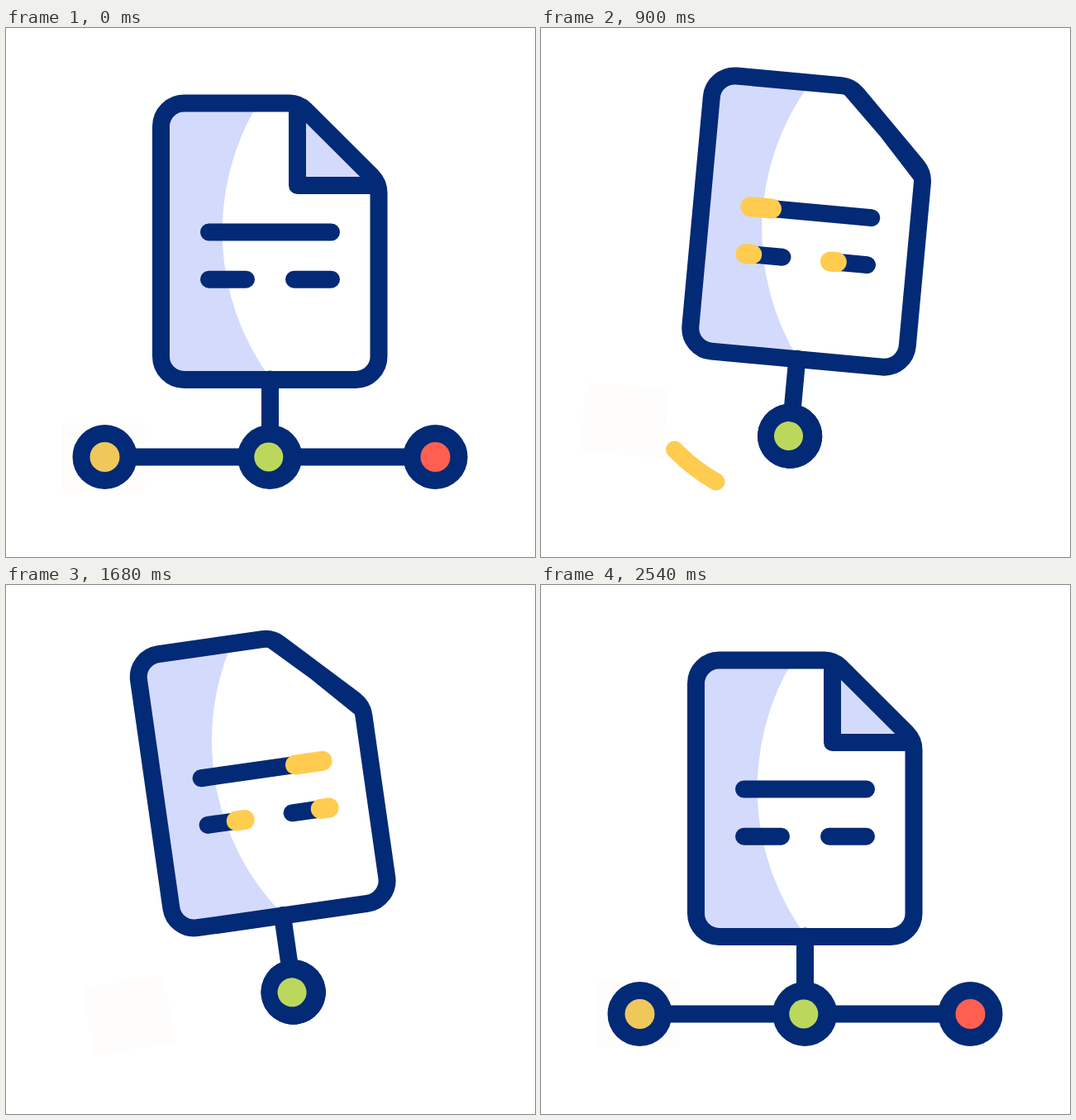
An HTML page that plays this animation: 640x640 px, repeating every 2.8 s.

```html
<!DOCTYPE html>
<html lang="en">
<head>
<meta charset="utf-8">
<title>Document network</title>
<style>
  html, body { margin: 0; width: 100%; height: 100%; overflow: hidden; background: #fff; }
  svg { display: block; width: 100%; height: 100%; }
  .line { fill: none; stroke: #032a76; stroke-width: 21; stroke-linecap: round; stroke-linejoin: round; }
  .glow { fill: none; stroke: #ffcc4f; stroke-width: 21; stroke-linecap: round; }
  .wide { stroke-width: 24; }
  .ring { fill: #032a76; }
  .tint { fill: #d4dafc; }
</style>
</head>
<body>
<svg viewBox="0 0 640 640">
  <path id="smile" class="glow"/>
  <g id="trail">
    <path class="glow"/>
    <path class="glow"/>
  </g>
  <g id="icon">
    <rect x="68" y="477" width="100" height="83" fill="#fffdfb"/>
    <path class="line" d="M319.5 425V500"/>
    <path id="wire" class="line"/>
    <g id="left">
      <circle class="ring" r="39"/>
      <circle r="18" fill="#f0c75b"/>
    </g>
    <g id="right">
      <circle class="ring" r="39"/>
      <circle r="18" fill="#ff5f51"/>
    </g>
    <circle class="ring" cx="319.2" cy="519" r="39"/>
    <circle cx="317.8" cy="519" r="17.5" fill="#bbd85d"/>

    <path class="tint" d="M305 91A300 300 0 0 0 321 425.5H215.5a28 28 0 0 1-28-28V119a28 28 0 0 1 28-28Z"/>
    <path id="flap" class="tint"/>
    <path id="fold" class="line"/>
    <path class="line" d="M215.5 91H342.5Q354 91 362 99L442.5 179.3Q451 188 451 199.5V397.5a28 28 0 0 1-28 28H215.5a28 28 0 0 1-28-28V119a28 28 0 0 1 28-28Z"/>
    <path class="line" d="M245.5 247H393.5M245.5 304.2H290.5M348.5 304.2H393.5"/>
    <g id="marks">
      <path class="glow wide"/>
      <path class="glow wide"/>
      <path class="glow wide"/>
    </g>
  </g>
</svg>
<script>
const LOOP = 2800, STEP = 20;
const CX = 319.5, CY = 319, NODE_Y = 519, SPREAD = 200;
const ROWS = [[245.5, 393.5, 247], [245.5, 290.5, 304.2], [348.5, 393.5, 304.2]];

const $ = id => document.getElementById(id);
const mix = (a, b, k) => a + (b - a) * k;
const phase = (t, a, b) => Math.min(1, Math.max(0, (t - a) / (b - a)));
const sine = (t, a, b) => (1 - Math.cos(Math.PI * phase(t, a, b))) / 2;
const cubic = (t, a, b) => {
  const p = phase(t, a, b);
  return p < 0.5 ? 4 * p ** 3 : 1 - 4 * (1 - p) ** 3;
};

function tilt(t) {
  if (t < 415) return -14.6 * cubic(t, 90, 415);
  if (t < 1172) return mix(-14.6, 13.2, sine(t, 415, 1172));
  if (t < 1920) return mix(13.2, -14.6, sine(t, 1172, 1920));
  return mix(-14.6, 0, sine(t, 1920, 2304));
}

const lift = t => 24.4 * (sine(t, 100, 700) - sine(t, 1680, 2520));

function spread(t) {
  return t < 1300
    ? SPREAD * (1 - phase(t, 100, 756) ** 3)
    : SPREAD * (1 - (1 - phase(t, 1818, 2474)) ** 3);
}

const pose = (angle, up) => `translate(0 ${-up}) rotate(${angle} ${CX} ${CY})`;

// Draws the part of a stroke between two fractions, or nothing when empty
function trim(el, from, to, path) {
  el.setAttribute("d", to - from > 0.002 ? path(from, to) : "");
}

function drawFold(t) {
  const k = sine(t, 100, 555) - sine(t, 1740, 2140);
  const x = mix(352.5, 402, k), y = mix(190.5, 140, k);
  const d = `M${352.5 + 3 * k} 95L${x} ${y}L447 ${190.5 - 2 * k}`;
  $("fold").setAttribute("d", d);
  $("flap").setAttribute("d", d + "Z");
}

function drawNodes(t) {
  const s = spread(t);
  $("left").setAttribute("transform", `translate(${CX - s} ${NODE_Y})`);
  $("right").setAttribute("transform", `translate(${CX + s} ${NODE_Y})`);
  $("wire").setAttribute("d", `M${CX - s} ${NODE_Y}H${CX + s}`);
}

function drawGlow(t) {
  const end = sine(t, 720, 1365);
  const from = sine(t, 838, 2063);
  ROWS.forEach(([a, b, y], i) =>
    trim($("marks").children[i], from, end, (p, q) => `M${mix(a, b, p)} ${y}H${mix(a, b, q)}`));

  const spot = f => {
    const a = mix(-46, 46, f) * Math.PI / 180;
    return `${320.5 + 221 * Math.sin(a)} ${356.5 + 221 * Math.cos(a)}`;
  };
  trim($("smile"), sine(t, 1140, 1640), end, (p, q) => `M${spot(p)}A221 221 0 0 0 ${spot(q)}`);

  $("trail").setAttribute("transform", pose(tilt(t - 42), lift(t)));
  [-1, 1].forEach((side, i) =>
    trim($("trail").children[i], sine(t, 2260, 2480), sine(t, 2140, 2400),
      (p, q) => `M${CX + side * mix(34, 110, p)} 571H${CX + side * mix(34, 110, q)}`));
}

function draw(t) {
  $("icon").setAttribute("transform", pose(tilt(t), lift(t)));
  drawFold(t);
  drawNodes(t);
  drawGlow(t);
}

const start = performance.now();
function tick() {
  const t = (performance.now() - start) % LOOP;
  draw(Math.floor(t / STEP) * STEP);
  requestAnimationFrame(tick);
}
draw(0);
requestAnimationFrame(tick);
</script>
</body>
</html>
```
